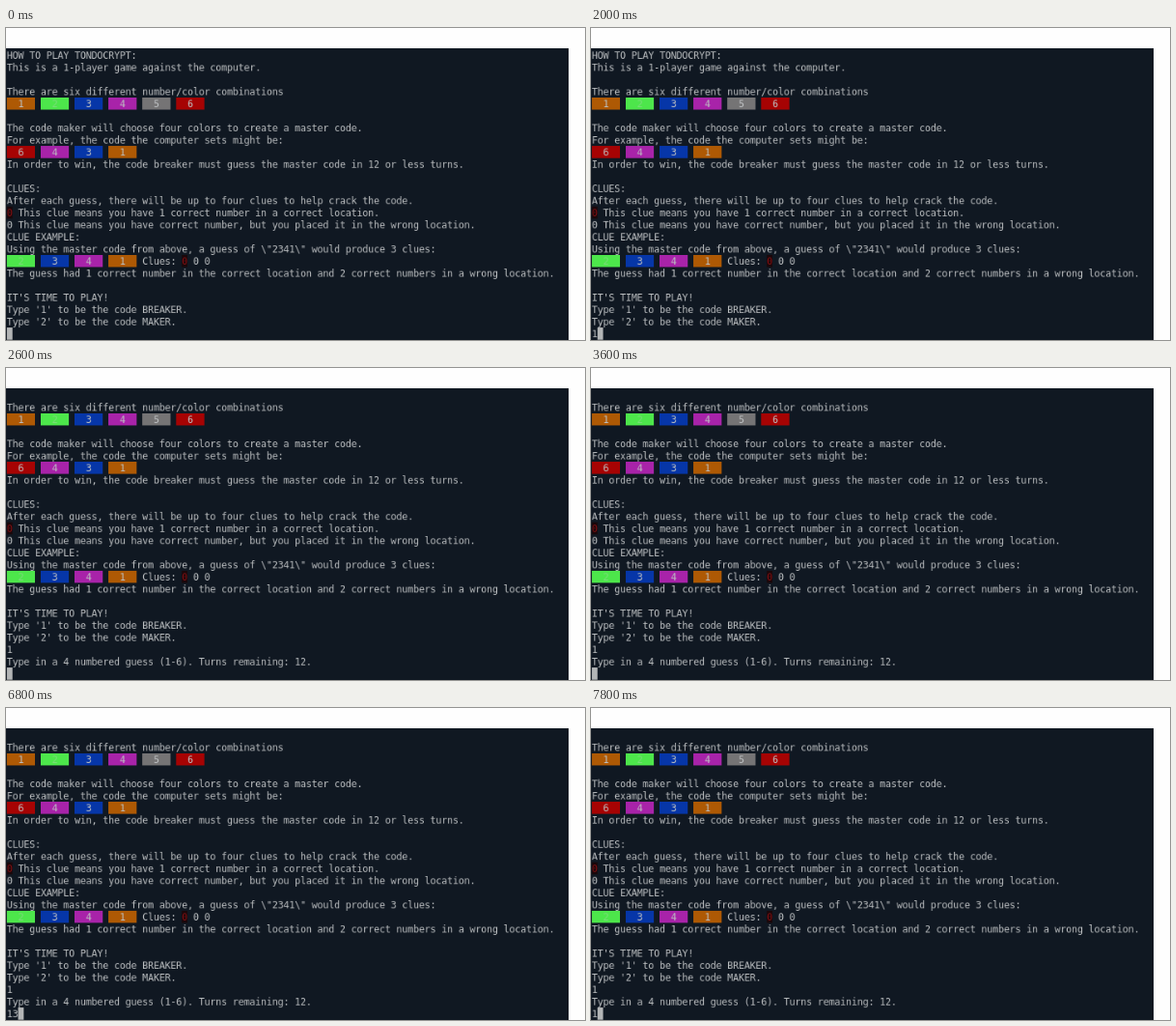
These frames come from a looping animation (600 px wide and 323 px high, 8 s). An HTML page with a canvas:

```html
<!DOCTYPE html>
<html lang="en">
<head>
<meta charset="utf-8">
<title>Code game terminal</title>
<style>
  html, body { margin: 0; width: 100%; height: 100%; overflow: hidden; background: #fefefe; }
  canvas { display: block; }
</style>
</head>
<body>
<canvas id="stage" width="600" height="323"></canvas>
<script>
const LOOP = 8000, ROWS = 24;
const CELL = 7, LINE = 15, PAD = 1, BASELINE = 12;
const SCALE = 0.8357, TOP = 21; // the terminal is drawn on whole pixels, then shrunk
const BACKGROUND = '#101822', TEXT = '#bcbfc1';
const BLOCKS = ['', '#ae5904', '#4de64b', '#0636a8', '#a823a9', '#757475', '#a60303'];

const stage = document.getElementById('stage').getContext('2d');
const screen = document.createElement('canvas');
screen.width = 698;
screen.height = 2 * PAD + ROWS * LINE;
const term = screen.getContext('2d');

// {n} is a five-cell colour block, * is a red clue
const intro = `HOW TO PLAY TONDOCRYPT:
This is a 1-player game against the computer.

There are six different number/color combinations
{1} {2} {3} {4} {5} {6}

The code maker will choose four colors to create a master code.
For example, the code the computer sets might be:
{6} {4} {3} {1}
In order to win, the code breaker must guess the master code in 12 or less turns.

CLUES:
After each guess, there will be up to four clues to help crack the code.
* This clue means you have 1 correct number in a correct location.
0 This clue means you have correct number, but you placed it in the wrong location.
CLUE EXAMPLE:
Using the master code from above, a guess of \\"2341\\" would produce 3 clues:
{2} {3} {4} {1} Clues: * 0 0
The guess had 1 correct number in the correct location and 2 correct numbers in a wrong location.

IT'S TIME TO PLAY!
Type '1' to be the code BREAKER.
Type '2' to be the code MAKER.`.split('\n');
const prompt = ['1', 'Type in a 4 numbered guess (1-6). Turns remaining: 12.'];

// [start time, whether the guess prompt is shown, typed input]
const states = [
  [0, false, ''], [1600, false, '1'], [2200, true, ''],
  [4600, true, '1'], [6600, true, '13'], [7600, true, '1']
];

function fillCells(col, row, count, color) {
  term.fillStyle = color;
  term.fillRect(PAD + col * CELL, PAD + row * LINE, count * CELL, LINE);
}

function write(text, col, row, color) {
  term.fillStyle = color;
  [...text].forEach((char, i) =>
    term.fillText(char, PAD + (col + i) * CELL, PAD + row * LINE + BASELINE));
}

function drawLine(line, row) {
  let col = 0;
  for (const part of line.split(/(\{\d\}|\*)/)) {
    if (part[0] === '{') {
      const digit = part[1];
      fillCells(col, row, 5, BLOCKS[digit]);
      write(digit, col + 2, row, digit === '2' ? '#79dc78' : TEXT);
      col += 5;
    } else if (part === '*') {
      fillCells(col, row, 1, '#1a080b');
      write('0', col, row, '#7e1013');
      col++;
    } else {
      write(part, col, row, TEXT);
      col += part.length;
    }
  }
}

function draw(time) {
  const [, prompted, input] = states.findLast(([start]) => time >= start);
  const lines = [...intro, ...(prompted ? prompt : []), input].slice(-ROWS);

  term.fillStyle = BACKGROUND;
  term.fillRect(0, 0, screen.width, screen.height);
  term.font = '12px "DejaVu Sans Mono", monospace';
  lines.forEach(drawLine);
  fillCells(input.length, lines.length - 1, 1, '#b3b5b6');

  stage.fillStyle = '#fefefe';
  stage.fillRect(0, 0, 600, 323);
  stage.imageSmoothingQuality = 'high';
  stage.drawImage(screen, 0, TOP, screen.width * SCALE, screen.height * SCALE);
}

function tick() {
  draw(performance.now() % LOOP);
  requestAnimationFrame(tick);
}
tick();
</script>
</body>
</html>
```
